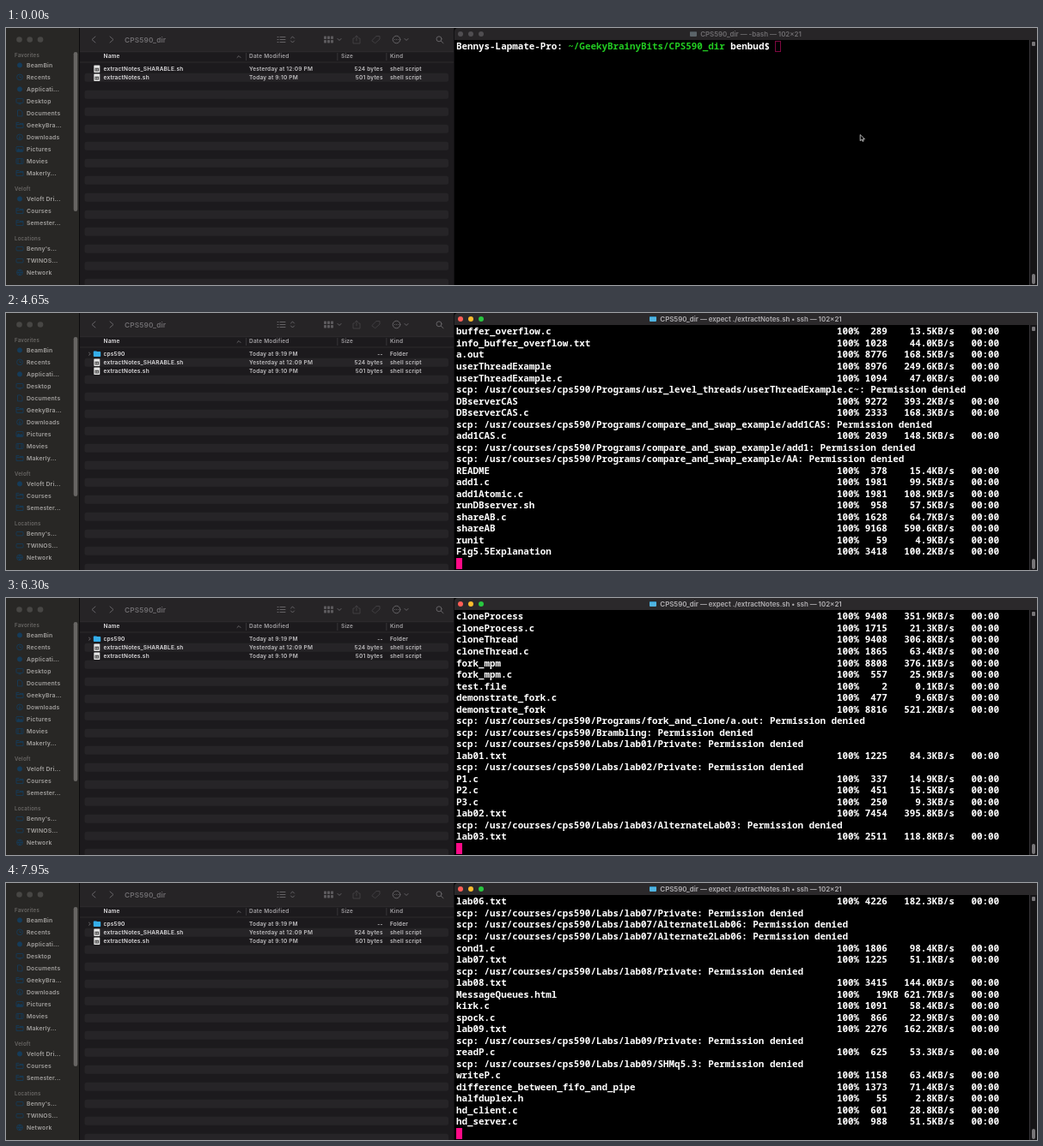
Animation, 1200 px wide and 300 px high, one loop 8000 ms. Source, as an HTML page:

```html
<!DOCTYPE html>
<html lang="en">
<head>
<meta charset="utf-8">
<title>Copying course notes</title>
<style>
html, body { margin: 0; width: 1200px; height: 300px; overflow: hidden; background: #000; }
body { position: relative; font-family: Inter, "Open Sans", sans-serif; }
svg { position: absolute; left: 0; top: 0; }
#ui text { font-size: 6.5px; font-weight: 600; letter-spacing: .2px; fill: #c0bfc1; dominant-baseline: central; }
#ui .side { font-size: 6.8px; fill: #a3a19f; }
#ui .head { font-size: 6.1px; fill: #6a6866; }
#ui .name { fill: #e0dfe1; }
#ui .col { fill: #a3a1a4; }
#ui .title { font-size: 8.2px; fill: #6f6d70; }
.line { fill: none; stroke: #656366; stroke-width: 1; stroke-linecap: round; stroke-linejoin: round; }
.dim { stroke: #403e41; }
.icon { fill: none; stroke: #163c5a; stroke-width: .9; }
.icon .solid { fill: #163c5a; }
#term { position: absolute; left: 522px; top: 0; width: 678px; height: 300px; background: #000; overflow: hidden; }
#bar { position: absolute; inset: 0 0 auto 0; height: 14px; border-radius: 4px 0 0 0; background: #272527; display: flex; align-items: center; justify-content: center; gap: 4px; white-space: pre; font-size: 7.9px; font-weight: 600; color: #6f6d70; }
#bar i { position: absolute; top: 4px; width: 6.4px; height: 6.4px; border-radius: 50%; background: #504e51; }
#dir { width: 8px; height: 6px; border-radius: 1px; background: #5b6469; border-top: 1px solid #495156; box-sizing: border-box; }
.active #bar { background: #2b292b; color: #b3b1b4; }
.active #dir { background: #4fb3e0; border-color: #2e8fc1; }
.active #bar .r { background: #ff5f57; }
.active #bar .y { background: #febc2e; }
.active #bar .g { background: #28c840; }
#out { position: absolute; left: 2px; top: 14.4px; margin: 0; font: 600 10.86px/13.53px "Noto Sans Mono", "DejaVu Sans Mono", monospace; color: #fff; }
#out b { font-weight: 700; }
#out .cwd { color: #22cc22; }
#out u { position: absolute; width: 6.5px; height: 13px; margin-top: .5px; box-sizing: border-box; border: 1px solid #7d0840; }
.active #out u { background: #ff0a87; border: 0; }
#scroll { position: absolute; right: 0; top: 14px; width: 8px; bottom: 0; background: #151416; border-left: 1px solid #38363a; }
#scroll i { position: absolute; left: 2px; width: 4px; background: #777578; border-radius: 2px; }
</style>
</head>
<body>
<svg id="ui" width="1200" height="300"></svg>
<div id="term">
  <div id="bar">
    <i class="r" style="left:4px"></i><i class="y" style="left:16px"></i><i class="g" style="left:28px"></i>
    <span id="dir"></span><span id="title"></span>
  </div>
  <pre id="out"></pre>
  <div id="scroll"><i style="top:2px;height:5px;border-radius:1px"></i><i style="bottom:1px;height:12px"></i></div>
</div>
<svg width="1200" height="300"><path id="mouse" d="M0 0v7l1.8-1.4 1.1 2.2 1.1-.5-1-2.2h2.3z" fill="#000" stroke="#ddd" stroke-width=".8"/></svg>

<script>
const $ = id => document.getElementById(id);

// ---- file browser ----
const text = (x, y, s, cls = "") => `<text x="${x}" y="${y}" class="${cls}">${s}</text>`;
const rect = (x, y, w, h, fill, r = 0) => `<rect x="${x}" y="${y}" width="${w}" height="${h}" rx="${r}" fill="${fill}"/>`;
const path = (d, cls = "line") => `<path d="${d}" class="${cls}"/>`;

const folder = `<path d="M.5 1h3l1 1h4v5h-8zM.5 3.2h8"/>`;
const disk = `<rect x=".5" y="2" width="8" height="4.5" rx="1"/>`;
const glyphs = {
  dot: `<circle class="solid" cx="4.5" cy="4" r="2.6"/>`,
  clock: `<circle cx="4.5" cy="4" r="3.4"/><path d="M4.5 2v2.2h2"/>`,
  screen: `<rect x=".5" y="1" width="8" height="5" rx=".5"/><path d="M3 7.4h3"/>`,
  doc: `<path d="M2 .5h3.5l2 2v5H2z"/>`,
  down: `<circle cx="4.5" cy="4" r="3.4"/><path d="M4.5 2v4m-1.5-1.5l1.5 1.5 1.5-1.5"/>`,
  photo: `<rect x=".5" y="1" width="8" height="6" rx="1"/><path class="solid" d="M1 6l2-2.5 2 1.5 1.5-1 1.5 2z"/>`,
  film: `<rect x=".5" y="1" width="8" height="6" rx=".5"/><path d="M2.5 1v6m4-6v6"/>`,
  globe: `<circle cx="4.5" cy="4" r="3.4"/><path d="M1 4h7M4.5.6q-3 3.4 0 6.8q3-3.4 0-6.8"/>`,
  folder, disk
};
const sections = [
  ["Favorites", 31.5, 43, "BeamBin dot,Recents clock,Applicati... dot,Desktop screen,Documents doc,GeekyBra... folder,Downloads down,Pictures photo,Movies film,Makerly... folder"],
  ["Veloft", 187.5, 199, "Veloft_Dri... dot,Courses folder,Semester... folder"],
  ["Locations", 245.5, 257, "Benny's... disk,TWINOS... disk,Network globe"]
];

function sidebar() {
  let s = rect(0, 0, 85, 300, "#282725") + rect(85, 0, 1.5, 300, "#0c0b0c");
  for (const x of [15.5, 27.7, 40]) s += `<circle cx="${x}" cy="13.5" r="3.3" fill="#474644"/>`;
  for (const [head, y, first, items] of sections) {
    s += text(10, y, head, "head");
    items.split(",").forEach((item, i) => {
      const [label, icon] = item.split(" "), cy = first + 14 * i;
      s += `<g class="icon" transform="translate(11.5 ${cy - 3.6})">${glyphs[icon]}</g>`;
      s += text(24, cy + .2, label.replace("_", " "), "side");
    });
  }
  return s + rect(78.7, 28, 4.6, 186, "#676563", 2.3);
}

function toolbar() {
  let s = rect(86, 0, 435, 28, "#262426") + text(138, 13.5, "CPS590_dir", "title");
  s += path("M104 10l-4 3.5 4 3.5M121 10l4 3.5-4 3.5");
  s += path("M316 10.5h1m2 0h6M316 13.5h1m2 0h6M316 16.5h1m2 0h6M331.5 12l2-2 2 2M331.5 15l2 2 2-2");
  for (let i = 0; i < 6; i++) s += rect(370 + i % 3 * 4, i < 3 ? 9.5 : 14, 3, 3.4, "#5c5a5d", .6);
  s += path("M386 12.5l2 2 2-2M464 12.5l2 2 2-2");
  s += path("M405.5 12h-1.5v6h8v-6h-1.5M408 15v-6m-2 2l2-2 2 2M426 14.5l5-5h4v3.5l-5 4.5z", "line dim");
  s += `<circle cx="454.5" cy="13.5" r="4.3" class="line"/>` + path("M452.4 13.5h.1m2 0h.1m2 0h.1");
  return s + `<circle cx="504" cy="12.8" r="3" class="line"/>` + path("M506.3 15.2l2.7 2.5");
}

function listing() {
  let s = rect(86, 28, 435, 272, "#1c1a1d");
  for (let y = 52.8; y < 300; y += 20) s += rect(91.5, y, 423.5, 10, "#262427", 2.5);
  s += rect(86, 39.6, 435, .8, "#302e31") + rect(86, 27.4, 435, .8, "#302e31");
  for (const x of [279, 385.5, 442.5]) s += rect(x, 29, .8, 9, "#3d3b3e");
  s += text(113.5, 33.3, "Name", "name") + text(283, 33.3, "Date Modified", "col");
  s += text(390, 33.3, "Size", "col") + text(447, 33.3, "Kind", "col");
  return s + path("M269 34.5l2-2 2 2");
}

function fileRow(y, [name, date, size, kind]) {
  const icon = kind == "Folder"
    ? path(`M96.5 ${y - 1.5}l1.8 1.5-1.8 1.5`) + rect(101.8, y - 3.5, 4, 3, "#1d83c2", .8) + rect(101.8, y - 2.6, 8.4, 6, "#35aeea", .8)
    : rect(102.3, y - 4.2, 7, 8.4, "#e6e6e6", .6) + rect(103.5, y - 1, 4.6, 3.8, "#454545") + rect(104.5, y, .8, 2, "#e6e6e6") + rect(106.3, y, .8, 2, "#e6e6e6");
  return icon + text(113.5, y, name, "name") + text(283, y, date) +
    `<text x="438.7" y="${y}" text-anchor="end">${size}</text>` + text(447, y, kind);
}

const files = [
  ["cps590", "Today at 9:19 PM", "--", "Folder"],
  ["extractNotes_SHARABLE.sh", "Yesterday at 12:09 PM", "524 bytes", "shell script"],
  ["extractNotes.sh", "Today at 9:10 PM", "501 bytes", "shell script"]
];
$("ui").innerHTML = sidebar() + toolbar() + listing() + rect(521, 0, 3, 300, "#111012") + `<g id="rows"></g>`;

// ---- terminal ----
// "name size rate" is a copied file, "!path" a refused one
const log = `threadInfo.txt 1204 52.6KB/s
threadExample.c 1187 49.3KB/s
!Programs/buffer_overflow/stack
buffer_overflow.c 289 13.5KB/s
info_buffer_overflow.txt 1028 44.0KB/s
a.out 8776 168.5KB/s
userThreadExample 8976 249.6KB/s
userThreadExample.c 1094 47.0KB/s
!Programs/usr_level_threads/userThreadExample.c~
DBserverCAS 9272 393.2KB/s
DBserverCAS.c 2333 168.3KB/s
!Programs/compare_and_swap_example/add1CAS
add1CAS.c 2039 148.5KB/s
!Programs/compare_and_swap_example/add1
!Programs/compare_and_swap_example/AA
README 378 15.4KB/s
add1.c 1981 99.5KB/s
add1Atomic.c 1981 108.9KB/s
runDBserver.sh 958 57.5KB/s
shareAB.c 1628 64.7KB/s
shareAB 9168 590.6KB/s
runit 59 4.9KB/s
Fig5.5Explanation 3418 100.2KB/s
!Programs/sem_synch_fig5.5/Fig5.5Explanation~
reader_priority_starvation 1311 68.5KB/s
writer_priority_example 3388 161.9KB/s
unnamedPipeExample.c 899 39.0KB/s
!Programs/unnamedPipes/mypipe
!Programs/unnamedPipes/unnamedPipeExample
!Programs/unnamedPipes/xyz
unnamedPipesInfo 1797 70.7KB/s
DBserver 9240 351.9KB/s
DBserver.c 2222 127.0KB/s
echoProgramExample.txt 1838 91.6KB/s
DBserverExplain.txt 2978 153.4KB/s
add1.c 1981 122.0KB/s
abExample.txt 977 42.4KB/s
add1 9168 402.1KB/s
add1Explain.txt 645 28.4KB/s
shareAB.c 1628 70.2KB/s
shareAB 9168 388.5KB/s
!Programs/fork_and_clone/clone
cloneProcess 9408 351.9KB/s
cloneProcess.c 1715 21.3KB/s
cloneThread 9408 306.8KB/s
cloneThread.c 1865 63.4KB/s
fork_mpm 8808 376.1KB/s
fork_mpm.c 557 25.9KB/s
test.file 2 0.1KB/s
demonstrate_fork.c 477 9.6KB/s
demonstrate_fork 8816 521.2KB/s
!Programs/fork_and_clone/a.out
!Brambling
!Labs/lab01/Private
lab01.txt 1225 84.3KB/s
!Labs/lab02/Private
P1.c 337 14.9KB/s
P2.c 451 15.5KB/s
P3.c 250 9.3KB/s
lab02.txt 7454 395.8KB/s
!Labs/lab03/AlternateLab03
lab03.txt 2511 118.8KB/s
!Labs/lab03/Private
lab04.txt 2140 96.1KB/s
!Labs/lab04/Private
test.file 2 0.1KB/s
add1.c 1981 114.2KB/s
add1Explain.txt 645 30.1KB/s
!Labs/lab05/AlternateLab05
DBserver.c 2282 118.5KB/s
lab05.txt 1860 97.7KB/s
!Labs/lab05/Private
!Labs/lab06/SHMq5.3
thread2.c 898 38.0KB/s
suspiciousSleep.c 1423 75.6KB/s
badpcSleep.c 1415 120.7KB/s
!Labs/lab06/Private
badpc.c 1397 66.2KB/s
suspicious.c 1371 64.4KB/s
sample_output 586 29.6KB/s
lab06.txt 4226 182.3KB/s
!Labs/lab07/Private
!Labs/lab07/Alternate1Lab06
!Labs/lab07/Alternate2Lab06
cond1.c 1806 98.4KB/s
lab07.txt 1225 51.1KB/s
!Labs/lab08/Private
lab08.txt 3415 144.0KB/s
MessageQueues.html 19KB 621.7KB/s
kirk.c 1091 58.4KB/s
spock.c 866 22.9KB/s
lab09.txt 2276 162.2KB/s
!Labs/lab09/Private
readP.c 625 53.3KB/s
!Labs/lab09/SHMq5.3
writeP.c 1158 63.4KB/s
difference_between_fifo_and_pipe 1373 71.4KB/s
halfduplex.h 55 2.8KB/s
hd_client.c 601 28.8KB/s
hd_server.c 988 51.5KB/s`.split("\n");

const meter = (name, pct, size, rate, eta) => name.padEnd(68) + pct.padStart(4) +
  (size.endsWith("KB") ? size.padStart(7) : size.padStart(5) + "  ") + rate.padStart(10) + "   " + eta;

function logLine(entry, done) {
  if (entry[0] == "!") return `scp: /usr/courses/cps590/${entry.slice(1)}: Permission denied`;
  const [name, size, rate] = entry.split(" ");
  return done ? meter(name, "100%", size, rate, "00:00") : meter(name, "0%", "0", "0.0KB/s", "--:-- ETA");
}

// linear interpolation through [time, value] points
function along(points, t) {
  let i = 1;
  while (i < points.length - 1 && t > points[i][0]) i++;
  const [[t0, a], [t1, b]] = [points[i - 1], points[i]];
  return a + (b - a) * Math.min(1, Math.max(0, (t - t0) / (t1 - t0)));
}

const prompt = `<b>Bennys-Lapmate-Pro: <span class="cwd">~/GeekyBrainyBits/CPS590_dir</span> benbud$ </b>`;
const keys = [[1150, "."], [1250, "/"], [1350, "e"], [1500, "x"], [1650, "t"], [1900, "ractNotes"], [2150, "."], [2250, "s"], [2350, "h"]];
const pace = [[3650, 0], [4650, 23.3], [5250, 37.9], [6300, 62.3], [7300, 85.3], [7950, 100.3]];

function screen(t) {
  const lines = [prompt + keys.filter(k => t >= k[0]).map(k => k[1]).join("")];
  if (t >= 3050) lines.push(t < 3100 ? "" : "spawn scp -r benbud@host:/usr/courses/cps590 ./");
  if (t >= 3200) lines.push(t < 3350 ? "" : "benbud@host's password: ");
  if (t >= 3500) {
    const n = along(pace, t), whole = Math.floor(n), next = log[whole];
    for (let i = 0; i < whole; i++) lines.push(logLine(log[i], true));
    lines.push(next && n - whole > .75 && next[0] != "!" ? logLine(next, false) : "");
  }
  return lines.slice(-21).join("\n") + "<u></u>";
}

function draw(t) {
  $("term").className = t >= 450 ? "active" : "";
  $("title").textContent = "CPS590_dir — " +
    (t < 3100 ? "-bash" : "expect ./extractNotes.sh" + (t < 3200 ? "" : " • ssh")) + " — 102×21";
  $("out").innerHTML = screen(t);
  $("rows").innerHTML = files.slice(t < 3700 ? 1 : 0).map((f, i) => fileRow(47.7 + 10 * i, f)).join("");
  const x = along([[0, 994.2], [400, 990], [850, 996]], t), y = along([[0, 124.6], [400, 131], [850, 134]], t);
  $("mouse").setAttribute("transform", `translate(${x} ${y})`);
  $("mouse").style.display = t < 1150 ? "" : "none";
}

const start = performance.now();
let shown = -1;
function tick() {
  const t = Math.floor((performance.now() - start) % 8000 / 50) * 50;
  if (t != shown) draw(shown = t);
  requestAnimationFrame(tick);
}
tick();
</script>
</body>
</html>
```
